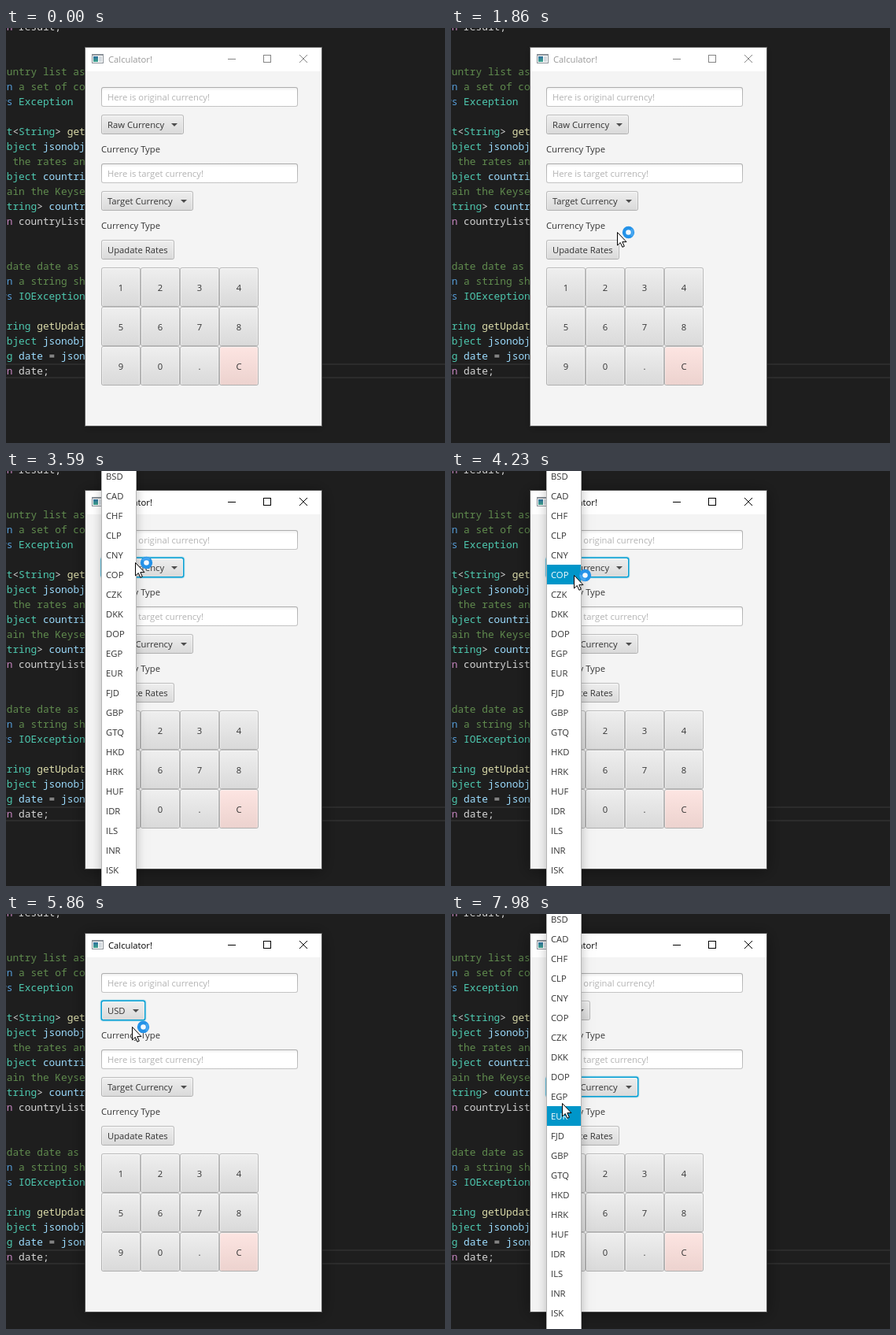
An HTML page with a canvas that plays this animation: 558 by 527 pixels, repeating every 8 s.

```html
<!DOCTYPE html>
<html lang="en">
<head>
<meta charset="utf-8">
<title>Calculator</title>
<style>
  html, body { margin: 0; width: 100%; height: 100%; overflow: hidden; background: #1e1e1e; }
  canvas { display: block; }
</style>
</head>
<body>
<canvas id="stage" width="558" height="527"></canvas>
<script>
const ctx = document.getElementById('stage').getContext('2d');
const LOOP = 8000;
const UI_FONT = '11.25px "Open Sans", "Noto Sans", sans-serif';
const CODE_FONT = '12.83px "Noto Sans Mono", "DejaVu Sans Mono", monospace';

// Code behind the window: line number, then colour key and text pairs.
const INK = { c: '#608b4e', k: '#569cd6', t: '#4ec9b0', v: '#9cdcfe', f: '#dcdcaa', w: '#d4d4d4', r: '#c586c0' };
const CODE = [
  [0, 'r', 'rn', 'w', ' result;'],
  [3, 'c', 'ountry list as'],
  [4, 'k', 'rn', 'c', ' a set of co'],
  [5, 'k', 'ws', 't', ' Exception'],
  [7, 't', 'et', 'w', '<', 't', 'String', 'w', '> ', 'f', 'get'],
  [8, 't', 'Object', 'v', ' jsonobj'],
  [9, 'c', 't the rates an'],
  [10, 't', 'Object', 'v', ' countri'],
  [11, 'c', 'tain the Keyse'],
  [12, 't', 'String', 'w', '> ', 'v', 'countr'],
  [13, 'r', 'rn', 'w', ' countryList'],
  [16, 'c', 'pdate date as'],
  [17, 'k', 'rn', 'c', ' a string sh'],
  [18, 'k', 'ws', 't', ' IOException'],
  [20, 't', 'tring', 'f', ' getUpdat'],
  [21, 't', 'Object', 'v', ' jsonobj'],
  [22, 't', 'ng', 'v', ' date', 'w', ' = ', 'v', 'json'],
  [23, 'r', 'rn', 'w', ' date;']
];
const CURRENCIES = ('BSD CAD CHF CLP CNY COP CZK DKK DOP EGP EUR FJD GBP GTQ ' +
  'HKD HRK HUF IDR ILS INR ISK JPY').split(' ');

// Pointer runs, each a list of [time, x, y]; the pointer is hidden between runs.
const RUNS = [
  { end: 3110, keys: [[580, 447, 516], [1370, 337, 367], [1860, 211, 259], [2190, 172, 140],
    [2240, 172, 140], [2420, 164, 120], [2570, 164, 120], [2650, 174, 122], [2799, 174, 122], [2800, 175, 122]] },
  { end: 4640, keys: [[3110, 164, 116], [3590, 164, 116], [3950, 160, 156], [4230, 156, 132],
    [4380, 152, 104], [4640, 150, -22]] },
  { end: 6910, keys: [[5660, 163, 21], [5860, 160, 143], [6120, 170, 225], [6550, 170, 225], [6910, 170, 53]] },
  { end: LOOP, keys: [[7370, 141, 69], [7750, 145, 255], [7900, 145, 255], [7980, 141, 240]] }
];

function pointerAt(t) {
  const run = RUNS.find(r => t >= r.keys[0][0] && t < r.end);
  if (!run) return null;
  const i = run.keys.findIndex(k => k[0] > t);
  if (i < 0) {
    const [, x, y] = run.keys[run.keys.length - 1];
    return { x, y };
  }
  const [t0, x0, y0] = run.keys[i - 1], [t1, x1, y1] = run.keys[i];
  const p = (t - t0) / (t1 - t0);
  return { x: Math.round(x0 + (x1 - x0) * p), y: Math.round(y0 + (y1 - y0) * p) };
}

function text(str, x, y, color = '#333', align = 'left') {
  ctx.fillStyle = color;
  ctx.textAlign = align;
  ctx.fillText(str, x, y);
}

function box(x, y, w, h, r, fill) {
  ctx.fillStyle = fill;
  ctx.beginPath();
  ctx.roundRect(x, y, w, h, r);
  ctx.fill();
}

function vertical(y, h, top, bottom) {
  const g = ctx.createLinearGradient(0, y, 0, y + h);
  g.addColorStop(0, top);
  g.addColorStop(1, bottom);
  return g;
}

function withShadow(blur, alpha, dy, draw) {
  ctx.save();
  ctx.shadowColor = `rgba(0,0,0,${alpha})`;
  ctx.shadowBlur = blur;
  ctx.shadowOffsetY = dy;
  draw();
  ctx.restore();
}

function drawCode() {
  ctx.fillStyle = '#1e1e1e';
  ctx.fillRect(0, 0, 558, 527);
  ctx.fillStyle = '#2c2c2c';
  ctx.fillRect(0, 426, 558, 2);
  ctx.fillRect(0, 443, 558, 2);
  ctx.font = CODE_FONT;
  for (const [line, ...parts] of CODE) {
    let x = -7;
    for (let i = 0; i < parts.length; i += 2) {
      text(parts[i + 1], x, 3 + line * 19, INK[parts[i]]);
      x += parts[i + 1].length * 7.7;
    }
  }
}

function drawFrame(active) {
  withShadow(active ? 18 : 9, active ? 0.45 : 0.3, 2, () => box(101, 25, 300, 480, 0, '#f4f4f4'));
  ctx.strokeStyle = active ? '#4a4a4a' : '#5c5c5c';
  ctx.lineWidth = 1;
  ctx.strokeRect(100.5, 24.5, 301, 481);
  box(101, 25, 300, 30, 0, '#fff');

  box(109, 33, 15, 12, 0, '#8b9299');
  box(110, 35, 13, 9, 0, '#fff');
  box(111, 36, 6, 7, 0, vertical(36, 7, '#2f6f9f', '#3fa58c'));
  box(118, 36, 4, 7, 0, '#d3d9de');

  const ink = active ? '#000' : '#999';
  text('Calculator!', 130, 44, ink);
  ctx.strokeStyle = active ? '#000' : '#858585';
  ctx.strokeRect(327.5, 34.5, 9, 9);
  ctx.beginPath();
  ctx.moveTo(282, 39.5); ctx.lineTo(292, 39.5);
  ctx.moveTo(373, 34); ctx.lineTo(383, 44);
  ctx.moveTo(383, 34); ctx.lineTo(373, 44);
  ctx.stroke();
}

function field(y, prompt) {
  box(121, y, 250, 25, 3, vertical(y, 25, '#adadad', '#c4c4c4'));
  box(122, y + 1, 248, 23, 2, vertical(y, 5, '#ebebeb', '#fff'));
  text(prompt, 129, y + 17, '#b3b3b3');
}

function button(x, y, w, h, pointer, { focus = false, pink = false } = {}) {
  const hover = pointer && pointer.x >= x && pointer.x < x + w && pointer.y >= y && pointer.y < y + h;
  if (focus) {
    box(x - 1.4, y - 1.4, w + 2.8, h + 2.8, 4, 'rgba(3,158,211,.25)');
    box(x - 0.4, y - 0.4, w + 0.8, h + 0.8, 3, '#039ed3');
  } else {
    box(x, y, w, h, 3, vertical(y, h, '#bcbcbc', '#b0b0b0'));
  }
  const [top, bottom] = pink ? (hover ? ['#ffeeec', '#f4dcd9'] : ['#fde5e2', '#ecd2ce'])
    : (hover ? ['#f4f4f4', '#e3e3e3'] : ['#efefef', '#d9d9d9']);
  box(x + 1, y + 1, w - 2, h - 2, 2, pink ? '#fff1ef' : '#f8f8f8');
  box(x + 1.5, y + 2, w - 3, h - 3, 2, vertical(y, h, top, bottom));
}

function combo(y, w, label, pointer, focus) {
  button(121, y, w, 25, pointer, { focus });
  text(label, 129, y + 17);
  const x = 121 + w - 12;
  ctx.fillStyle = '#4d4d4d';
  ctx.beginPath();
  ctx.moveTo(x - 4, y + 11);
  ctx.lineTo(x + 4, y + 11);
  ctx.lineTo(x, y + 15);
  ctx.fill();
}

function drawForm(t, pointer) {
  const picked = t >= 5350;
  field(75, 'Here is original currency!');
  combo(110, picked ? 56 : 105, picked ? 'USD' : 'Raw Currency', pointer, t >= 3110 && t < 6270);
  text('Currency Type', 121, 158);
  field(172, 'Here is target currency!');
  combo(207, 117, 'Target Currency', pointer, t >= 6270);
  text('Currency Type', 121, 255);
  button(121, 269, 93, 25, pointer);
  text('Upadate Rates', 129, 286);
  [...'1234567890.C'].forEach((key, i) => {
    const x = 121 + i % 4 * 50, y = 304 + Math.floor(i / 4) * 50;
    button(x, y, 50, 50, pointer, { pink: key === 'C' });
    text(key, x + 25, y + 30, '#333', 'center');
  });
}

function drawList(pointer) {
  withShadow(12, 0.25, 0, () => box(121, -40, 45, 620, 0, '#b5b5b5'));
  box(122, -40, 43, 620, 0, '#fff');
  const over = pointer && pointer.x < 163 ? Math.floor((pointer.y + 6) / 25) : -1;
  CURRENCIES.forEach((code, i) => {
    const y = i * 25 - 6;
    if (i === over) box(122, y, 43, 25, 0, '#0096c9');
    text(code, 127, y + 17, i === over ? '#fff' : '#333');
  });
}

const ARROW = [[0, 0], [0, 16.5], [3.8, 13], [6.4, 18.8], [8.8, 17.7], [6.3, 12.1], [11.5, 12.1]];

function drawPointer({ x, y }, t, busy) {
  ctx.beginPath();
  ARROW.forEach(([dx, dy]) => ctx.lineTo(x + dx + 0.5, y + dy + 0.5));
  ctx.closePath();
  ctx.fillStyle = '#fff';
  ctx.fill();
  ctx.strokeStyle = '#000';
  ctx.lineWidth = 1;
  ctx.stroke();
  if (!busy) return;
  const arc = (r, from, to, width, color) => {
    ctx.beginPath();
    ctx.arc(x + 14.5, y + 0.5, r, from, to);
    ctx.lineWidth = width;
    ctx.strokeStyle = color;
    ctx.stroke();
  };
  const turn = t / 1000 * Math.PI * 2;
  box(x + 11, y - 3, 7, 7, 3.5, '#f2f9ff');
  arc(5.5, 0, Math.PI * 2, 4.4, '#2492e8');
  arc(5.5, turn, turn + 1.8, 3, 'rgba(110,190,250,.45)');
}

function draw(t) {
  const pointer = pointerAt(t);
  const open = t >= 3440 && t < 5350 || t >= 6330;
  drawCode();
  ctx.font = UI_FONT;
  drawFrame(t >= 3110);
  drawForm(t, open ? null : pointer);
  // The highlighted row trails the pointer slightly.
  if (open) drawList(pointerAt(t - 50));
  if (pointer) drawPointer(pointer, t, t < 6910);
}

function tick() {
  draw(performance.now() % LOOP);
  requestAnimationFrame(tick);
}
tick();
</script>
</body>
</html>
```
